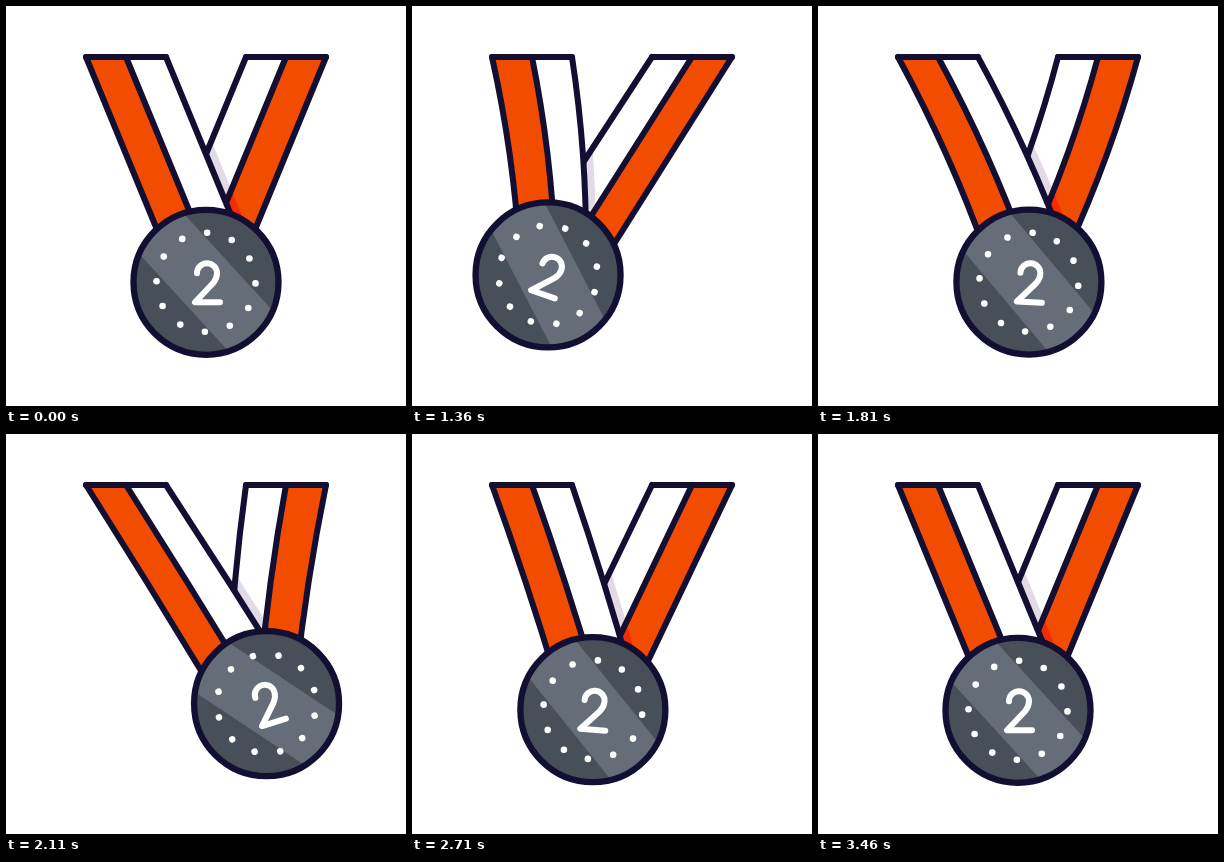
Animation of 400x400 px, one loop 3.49 s. Source, as an HTML page with a canvas:

```html
<!DOCTYPE html>
<html lang="en">
<head>
<meta charset="utf-8">
<title>Swinging medal</title>
<style>
  html, body { margin: 0; width: 100%; height: 100%; overflow: hidden; background: #fff; }
  canvas { display: block; width: 400px; height: 400px; }
</style>
</head>
<body>
<canvas id="stage" width="400" height="400"></canvas>
<script>
const ctx = document.getElementById('stage').getContext('2d');
const LOOP = 3490, START = 1000, STEP = 30;
const NAVY = '#120f33', ORANGE = '#f24c00', WHITE = '#fff';
const TOP = 51, BOTTOM = 245;

const SMOOTH = [.33, .67];

// Tracks hold [step, value, ease into this key]
const swing = [[0, 0], [17, -69, [.167, .4, .167]], [33, 74, [.55, .7]], [51, -30], [68, 7.6], [82, 0]];
const turn = [[0, 0], [17, 20.5, [.167, .4, .167]], [33, -21, [.68, .78]], [51, 7.5], [68, -2.8], [82, 0]];
const bowLeft = [[0, 0], [17, 10], [27, 9], [33, 0], [46, 6], [68, 0]];
const bowRight = [[17, 0], [27, 9], [33, -6], [46, 0]];

const cubic = (a, b, s) => 3 * (1 - s) ** 2 * s * a + 3 * (1 - s) * s * s * b + s ** 3;

// Timing curve (x1, y1, x2, 1), solved by bisection
function ease(u, [x1, x2, y1 = 0]) {
  let lo = 0, hi = 1;
  for (let i = 0; i < 24; i++) {
    const mid = (lo + hi) / 2;
    if (cubic(x1, x2, mid) < u) lo = mid; else hi = mid;
  }
  return cubic(y1, 1, lo);
}

function sample(track, step) {
  if (step <= track[0][0]) return track[0][1];
  for (let i = 1; i < track.length; i++) {
    const [t0, v0] = track[i - 1], [t1, v1, curve = SMOOTH] = track[i];
    if (step < t1) return v0 + (v1 - v0) * ease((step - t0) / (t1 - t0), curve);
  }
  return track[track.length - 1][1];
}

// Outer, middle and inner edge of one ribbon; side is -1 (left) or 1 (right)
function ribbonEdges(side, x, bow) {
  const drag = side * x > 0 ? [.26, .2, .07] : [.4, .39, .34];
  return [120, 80, 40].map((offset, i) => {
    const top = 200 + side * offset;
    const low = 200 + x + side * (48 - 40 * i) - x * drag[i];
    const end = top + (low - top) * (BOTTOM - TOP) / 175;
    return { top, end, mid: (top + end) / 2 + bow };
  });
}

function bandPath(a, b) {
  const half = (TOP + BOTTOM) / 2;
  ctx.beginPath();
  ctx.moveTo(a.top, TOP);
  ctx.quadraticCurveTo(a.mid, half, a.end, BOTTOM);
  ctx.lineTo(b.end, BOTTOM);
  ctx.quadraticCurveTo(b.mid, half, b.top, TOP);
  ctx.closePath();
}

function strokeEdge(e, color, width) {
  ctx.beginPath();
  ctx.moveTo(e.top, TOP);
  ctx.quadraticCurveTo(e.mid, (TOP + BOTTOM) / 2, e.end, BOTTOM);
  ctx.strokeStyle = color;
  ctx.lineWidth = width;
  ctx.stroke();
}

function drawBand(a, b, color, shadowEdge, shadowColor) {
  bandPath(a, b);
  ctx.fillStyle = color;
  ctx.fill();
  if (!shadowEdge) return;
  ctx.save();
  ctx.clip();
  strokeEdge(shadowEdge, shadowColor, 20);
  ctx.restore();
}

function drawRibbon([outer, middle, inner], shadowEdge) {
  drawBand(outer, middle, ORANGE, shadowEdge, '#f42c04');
  drawBand(middle, inner, WHITE, shadowEdge, '#e2dae6');
  for (const e of [outer, middle, inner]) strokeEdge(e, NAVY, 6);
  ctx.beginPath();
  ctx.moveTo(outer.top, TOP);
  ctx.lineTo(inner.top, TOP);
  ctx.stroke();
}

const DIGIT = new Path2D('M-9 -9A10 10 0 0 1 11 -9C11 -5 9.5 -2 7 1L-11 20H14');

function drawMedal(x, y, degrees) {
  const rad = Math.PI / 180;
  ctx.save();
  ctx.translate(x, y);

  const disc = new Path2D();
  disc.arc(0, 0, 72.5, 0, 7);
  ctx.fillStyle = '#474f59';
  ctx.fill(disc);
  ctx.save();
  ctx.clip(disc);
  ctx.rotate((47.5 + degrees * .8) * rad);
  ctx.fillStyle = '#656d79';
  ctx.fillRect(-80, -30, 160, 60);
  ctx.restore();
  ctx.strokeStyle = NAVY;
  ctx.lineWidth = 6.3;
  ctx.stroke(disc);

  ctx.rotate(degrees * rad);
  ctx.fillStyle = ctx.strokeStyle = WHITE;
  for (let i = 0; i < 12; i++) {
    const a = (i * 30 + 1.3) * rad;
    ctx.beginPath();
    ctx.arc(49.5 * Math.sin(a), -49.5 * Math.cos(a), 3.3, 0, 7);
    ctx.fill();
  }
  ctx.lineWidth = 6;
  ctx.stroke(DIGIT);
  ctx.restore();
}

function draw(now) {
  const step = Math.max(0, (now % LOOP - START) / STEP);
  const x = sample(swing, step);
  const left = ribbonEdges(-1, x, sample(bowLeft, step));
  const right = ribbonEdges(1, x, sample(bowRight, step));

  ctx.fillStyle = WHITE;
  ctx.fillRect(0, 0, 400, 400);
  ctx.lineCap = ctx.lineJoin = 'round';
  drawRibbon(right, left[2]);
  drawRibbon(left);
  drawMedal(200 + x, 276.3 - x * x * .0018, sample(turn, step));
}

function tick() {
  draw(performance.now());
  requestAnimationFrame(tick);
}
tick();
</script>
</body>
</html>
```
